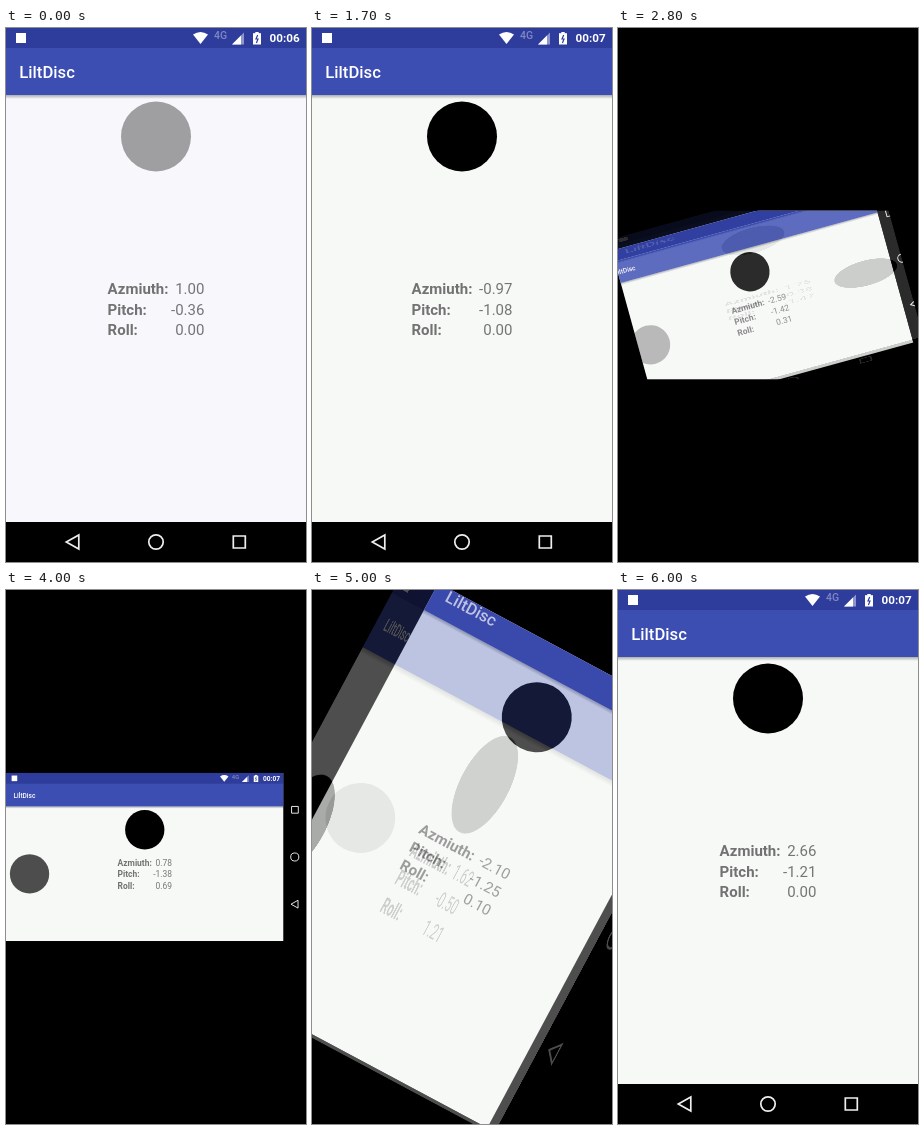
An HTML page with a canvas that plays this animation: 300 by 534 pixels, repeating every 6.1 s.

```html
<!DOCTYPE html>
<html lang="en">
<head>
<meta charset="utf-8">
<title>LiltDisc</title>
<style>
  html, body { margin: 0; width: 100%; height: 100%; overflow: hidden; background: #000; }
  canvas { display: block; }
</style>
</head>
<body>
<canvas id="stage" width="300" height="534"></canvas>
<script>
const LOOP = 6100, STEP = 100, W = 300, H = 534, NAV = 40, SS = 2;
const stage = document.getElementById('stage').getContext('2d');
let ctx = stage;

const lerp = (a, b, k) => a + (b - a) * k;
const span = (t, from, to) => Math.min(1, Math.max(0, (t - from) / (to - from)));
const blend = (a, b, k) => a.map((v, i) => lerp(v, b[i], k));

// poses: azimuth, pitch, roll
const start = [1, -0.36, 0], raised = [-0.97, -1.08, 0], tipped = [1.75, -0.38, -1.47];
const settled = [-2.59, -1.42, 0.31], rolled = [0.78, -1.38, 0.69], lowered = [1.62, -0.5, 1.21];
const back = [-2.1, -1.25, 0.1], rest = [2.66 - 2 * Math.PI, -1.21, 0];

function upright(t) {
  const k = span(t, 0, 1700);
  const pose = blend(start, raised, k);
  pose[2] += 0.45 * Math.sin(4 * Math.PI * k);
  return blend(pose, tipped, span(t, 1700, 2010));
}

const sideways = t =>
  blend(blend(settled, rolled, span(t, 3600, 4000)), lowered, span(t, 4000, 4300));

const returned = t => blend(back, rest, span(t, 5000, 6000) ** 2);

// decelerating quint over 400 ms
const swing = (t, from) => 1 - (1 - span(t, from, from + 400)) ** 5;

function box(color, x, y, w, h) {
  ctx.fillStyle = color;
  ctx.fillRect(x, y, w, h);
}

function text(str, x, y, size, weight, color, align = 'left') {
  ctx.font = `${weight} ${size}px Roboto, sans-serif`;
  ctx.textAlign = align;
  ctx.fillStyle = color;
  ctx.fillText(str, x, y);
}

function disc(x, y, r, color) {
  ctx.beginPath();
  ctx.arc(x, y, r, 0, 7);
  ctx.fillStyle = color;
  ctx.fill();
}

// right triangle with its corner at the lower right
function wedge(x, y, size, color) {
  ctx.beginPath();
  ctx.moveTo(x, y);
  ctx.lineTo(x - size, y);
  ctx.lineTo(x, y - size);
  ctx.fillStyle = color;
  ctx.fill();
}

function statusBar(w, clock) {
  const blue = '#2e3c9c';
  box(blue, 0, 0, w, 20);
  box('#fff', 10, 5, 10, 10);
  ctx.save();
  ctx.translate(w - W, 0);
  ctx.beginPath();
  ctx.moveTo(194.5, 16);
  ctx.lineTo(187, 6.6);
  ctx.quadraticCurveTo(194.5, 1.4, 202, 6.6);
  ctx.fillStyle = '#fff';
  ctx.fill();
  text('4G', 208, 10.9, 10.5, 500, '#8088c4');
  wedge(238, 16.5, 12, '#8e96cd');
  wedge(235, 16.5, 9, '#fff');
  box('#fff', 249.3, 4, 3.4, 2);
  box('#fff', 247, 5.2, 8, 11.3);
  ctx.beginPath();
  ctx.moveTo(251.7, 7);
  ctx.lineTo(250, 11);
  ctx.lineTo(252, 11);
  ctx.lineTo(250.4, 15);
  ctx.strokeStyle = blue;
  ctx.lineWidth = 1.2;
  ctx.stroke();
  text(clock, 293.7, 14.4, 11.7, 700, '#fff', 'right');
  ctx.restore();
}

function navBar(wide) {
  const edge = H - NAV;
  if (wide) box('#000', edge, 0, NAV, W);
  else box('#000', 0, edge, W, NAV);
  ctx.strokeStyle = '#eee';
  ctx.lineWidth = 1.7;
  for (const i of [-1, 0, 1]) {
    const x = wide ? 514 : 150 + 83 * i, y = wide ? 150 - 84 * i : 514;
    ctx.beginPath();
    if (i < 0) {
      ctx.moveTo(x - 6.7, y);
      ctx.lineTo(x + 5.8, y - 7);
      ctx.lineTo(x + 5.8, y + 7);
      ctx.closePath();
    } else if (i) {
      ctx.rect(x - 5.7, y - 6, 12, 12);
    } else {
      ctx.arc(x, y, 7.2, 0, 7);
    }
    ctx.stroke();
  }
}

function readout(cx, cy, vals) {
  const nums = vals.map(v => (Math.abs(v) < 0.005 ? 0 : v).toFixed(2));
  ctx.font = 'bold 15px Roboto, sans-serif';
  const labelW = ctx.measureText('Azmiuth:').width;
  ctx.font = '15px Roboto, sans-serif';
  const half = (labelW + 6.67 + ctx.measureText(nums[0]).width) / 2;
  ['Azmiuth:', 'Pitch:', 'Roll:'].forEach((label, i) => {
    const y = cy + 6 + (i - 1) * 20.3;
    text(label, cx - half, y, 15, 'bold', '#727272');
    text(nums[i], cx + half, y, 15, 400, '#757575', 'right');
  });
}

// one app screen, upright (300 x 534) or wide (534 x 300)
function screen(wide, [azimuth, pitch, roll], early) {
  const w = wide ? H - NAV : W, h = wide ? W : H - NAV, top = wide ? 60 : 67;
  const cx = w / 2, cy = (top + h) / 2;
  if (azimuth < -Math.PI) azimuth += 2 * Math.PI;
  if (Math.abs(roll) < 0.05) roll = 0;
  box(early ? '#f8f7fc' : '#f6f9f6', 0, 0, w, h);
  const shade = ctx.createLinearGradient(0, top, 0, top + 4);
  shade.addColorStop(0, 'rgba(0,0,0,.3)');
  shade.addColorStop(1, 'rgba(0,0,0,0)');
  box(shade, 0, top, w, 4);
  box('#3d4eb3', 0, 20, w, top - 20);
  statusBar(w, early ? '00:06' : '00:07');
  text('LiltDisc', 13.3, (20 + top) / 2 + (wide ? 4.2 : 6), wide ? 11.7 : 16.67, 500, '#fff');
  const spot = (x, y, v) => {
    if (v > 0) disc(x, y, 35, `rgba(0,0,0,${Math.min(1, v)})`);
  };
  spot(cx, top + 41.5, -pitch);
  spot(41.9, cy, roll);
  spot(w - 41.9, cy, -roll);
  readout(cx, cy, [azimuth, pitch, roll]);
  navBar(wide);
}

function snapshot(wide, vals) {
  const c = document.createElement('canvas');
  c.width = (wide ? H : W) * SS;
  c.height = (wide ? W : H) * SS;
  ctx = c.getContext('2d');
  ctx.scale(SS, SS);
  screen(wide, vals);
  ctx = stage;
  return c;
}

const oldUpright = snapshot(false, tipped);
const oldWide = snapshot(true, lowered);

// the new screen swings in, seen only inside the old one, which stretches and fades
function turn(wide, vals, old, p) {
  const w = wide ? H : W, h = wide ? W : H;
  const oldW = lerp(h, w, p), oldH = lerp(w, h, p);
  const clip = (cw, ch) => {
    ctx.beginPath();
    ctx.rect(-cw / 2, -ch / 2, cw, ch);
    ctx.clip();
  };
  ctx.save();
  ctx.translate(W / 2, H / 2);
  ctx.scale(W / w, W / w);
  clip(w, h);
  ctx.rotate((wide ? -1 : 1) * (1 - p) * Math.PI / 2);
  clip(oldW, oldH);
  ctx.save();
  ctx.translate(-w / 2, -h / 2);
  screen(wide, vals);
  ctx.restore();
  ctx.globalAlpha = 1 - p;
  ctx.drawImage(old, -oldW / 2, -oldH / 2, oldW, oldH);
  ctx.restore();
}

function draw(t) {
  box('#000', 0, 0, W, H);
  if (t < 2300) {
    screen(false, upright(t), t < 400);
    if (t >= 2200) {
      ctx.save();
      ctx.translate(0, W);
      ctx.rotate(-Math.PI / 2);
      ctx.drawImage(oldUpright, 0, 0, W, H);
      ctx.restore();
    }
  } else if (t < 4400) {
    turn(true, sideways(t), oldUpright, swing(t, 2681));
  } else {
    turn(false, returned(t), oldWide, swing(t, 4917));
  }
}

function frame(now) {
  draw(Math.floor(now % LOOP / STEP) * STEP);
  requestAnimationFrame(frame);
}
draw(0);
requestAnimationFrame(frame);
</script>
</body>
</html>
```
